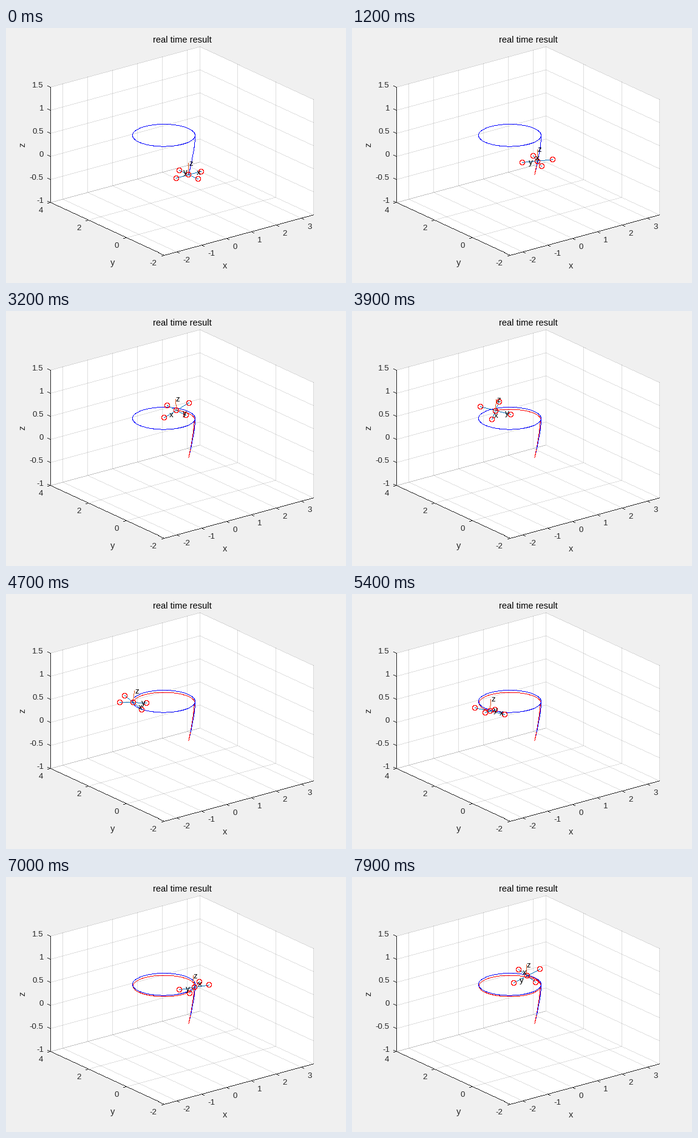
Animation, 560 px wide and 420 px high, one loop 8000 ms. Source, as a matplotlib script:

```python
import numpy as np
import matplotlib.pyplot as plt
from matplotlib.animation import FuncAnimation

W, H, DPI = 560, 420, 100
FRAMES, STEP = 80, 100
PX = 72 / DPI
DARK, BLUE, RED = "#262626", "#0000ff", "#ff0000"
ARM, AXIS = "#0072bd", "#d95319"
plt.rcParams["font.family"] = "Liberation Sans"
plt.rcParams["path.simplify"] = False

ORIGIN = np.array([300.35, 241.2])
BASIS = np.array([[40.95, -11.1], [-31.25, -14.5], [0, -76.0]])


def project(*p):
    return ORIGIN + np.array(p) @ BASIS


fig = plt.figure(figsize=(W / DPI, H / DPI), dpi=DPI, facecolor="#f0f0f0")
ax = fig.add_axes([0, 0, 1, 1])
ax.set_xlim(-0.5, W - 0.5)
ax.set_ylim(H - 0.5, -0.5)
ax.axis("off")


def raster(*lines):
    """Jagged one-pixel polylines, as a dash for every pixel they cross."""
    spots = []
    for pts in lines:
        pts = np.asarray(pts, float)
        spots.append(pts[-1:])
        for a, b in zip(pts[:-1], pts[1:]):
            n = int(np.ceil(np.abs(b - a).max()))
            spots.append(a + np.linspace(0, 1, n + 1)[:, None] * (b - a))
    x, y = np.unique(np.floor(np.concatenate(spots) + 0.5), axis=0).T
    gap = np.full_like(x, np.nan)
    return (np.stack([x - 0.5, x + 0.5, gap], 1).ravel(),
            np.stack([y, y, gap], 1).ravel())


def stroke(color, z=1, pts=None, alpha=1):
    xy = ([], []) if pts is None else raster(pts)
    return ax.plot(*xy, color=color, lw=PX, zorder=z, alpha=alpha,
                   solid_capstyle="butt", snap=False)[0]


def text(x, y, s, size=13.33, color=DARK, **kw):
    kw = {"ha": "center", "va": "center", **kw}
    return ax.text(x, y, s, fontsize=size * PX, color=color, zorder=8, **kw)


# Box walls, grid, axis lines and ticks
X0, X1, Y0, Y1, Z0, Z1 = -2.5, 3.5, -2, 4, -1, 1.5
outline = [(X0, Y1, Z1), (X1, Y1, Z1), (X1, Y0, Z1),
           (X1, Y0, Z0), (X0, Y0, Z0), (X0, Y1, Z0)]
ax.fill(*np.array([project(*p) for p in outline]).T, color="white", lw=0)


def grid(*pts):
    stroke(DARK, 1, [project(*p) for p in pts], alpha=0.15)


def tick(p, dx, dy):
    stroke(DARK, 2, [p, p + (dx, dy)])


for x in range(-2, 4):
    grid((x, Y0, Z0), (x, Y1, Z0), (x, Y1, Z1))
    p = project(x, Y0, Z0)
    tick(p, 4, 2)
    text(p[0] + 10, p[1] + 14.3, str(x), ha="left")
for y in range(-2, 5, 2):
    grid((X0, y, Z0), (X1, y, Z0), (X1, y, Z1))
    p = project(X0, y, Z0)
    tick(p, -4.5, 1.3)
    text(p[0] - 12.7, p[1] + 14, str(y), ha="right")
for z in np.arange(Z0, Z1 + 0.1, 0.5):
    grid((X0, Y1, z), (X1, Y1, z), (X1, Y0, z))
    p = project(X0, Y1, z)
    tick(p, -4.5, -2)
    text(p[0] - 11.5, p[1] - 2, f"{z:g}", ha="right")
stroke(DARK, 2, [project(*p) for p in
                 ((X0, Y1, Z1), (X0, Y1, Z0), (X0, Y0, Z0), (X1, Y0, Z0))])

text(290, 24, "real time result", 14.67, "black", va="baseline")
text(360, 391.5, "x", 14.67)
text(175.5, 387, "y", 14.67)
text(27, 191.5, "z", 14.67, rotation=90)

# Planned path: a climb that joins a circle
a = np.linspace(0, 2 * np.pi, 200)
stroke(BLUE, 4, [project(np.cos(q) - 1, np.sin(q), 1) for q in a])
u = np.linspace(0, 1, 40)[:, None]
stroke(BLUE, 4, (1 - u) ** 2 * ORIGIN + 2 * u * (1 - u) * np.array([311, 197])
       + u ** 2 * np.array([311.2, 176.3]))

CLIMB_END = 2.0
SKEW = np.radians(37.4)
RING = 4 * np.stack([np.cos(a), np.sin(a)], 1)


def phase(t):
    """Angle along the circle as seen on screen."""
    early = np.interp(t, [2.0, 2.7, 3.25], [10, 7.5, 0])
    return np.radians(65.5 + 74.7 * (t - 3.2) + early)


def centre(t):
    """Flown position in pixels."""
    v = np.clip((t - 0.2) / 2.4, 0, 1)
    rise = 65 * v ** 3 * (10 - 15 * v + 6 * v * v)
    s = rise / 58
    f = phase(t)
    cy = 179 - 2 * np.clip(t - 6.6, 0, 1)
    up = t < CLIMB_END
    x = np.where(up, ORIGIN[0] + 9.3 * s * (1.4 - 0.4 * s),
                 259.7 + 51 * np.cos(f))
    y = np.where(up, ORIGIN[1] - rise, cy - 17.5 * np.sin(f))
    return np.stack([x, y], axis=-1)


def body_axes(t):
    """Screen vectors of the unit body axes, yawing and leaning inward."""
    yaw = 0.984 * t
    lag = np.radians(57) * np.clip((3.8 - t) / 1.8, 0, 1)
    out = phase(t) - SKEW - lag
    lean = 0.18 * np.clip((t - 1.2) / 0.7, 0, 1)
    gx, gy = lean * np.cos(out), lean * np.sin(out)
    c, s = np.cos(yaw), np.sin(yaw)
    axes = np.array([[c, s, c * gx + s * gy],
                     [-s, c, -s * gx + c * gy],
                     [-gx, -gy, 1]])
    return axes @ BASIS


# The flown trail starts in front of the plan and goes on behind it
SPLIT = 1.0
trail_start, trail = stroke(RED, 5), stroke(RED, 3)
arms, mast, rotors = stroke(ARM, 6), stroke(AXIS, 6), stroke(RED, 7)
names = [text(0, 0, s, color="black", ha="left", va="baseline") for s in "xyz"]


def update(i):
    t = i * STEP / 1000
    ts = np.linspace(0, t, 4 * i + 1)
    path = centre(ts)
    trail_start.set_data(*raster(path[ts <= SPLIT]))
    later = path[ts >= SPLIT]
    trail.set_data(*(raster(later) if len(later) else ([], [])))

    c = path[-1]
    axes = body_axes(t)
    beams = [np.array([c - d / 2, c + d / 2]) for d in axes[:2]]
    arms.set_data(*raster(*beams))
    mast.set_data(*raster([c, c + axes[2] / 4]))
    hubs = np.floor(np.vstack([c, *beams]) + 0.5)
    rotors.set_data(*raster(*(hub + RING for hub in hubs)))
    for name, d, reach in zip(names, axes, (0.3, 0.3, 0.25)):
        name.set_position(c + d * reach + (0.5, 4))
    return [trail_start, trail, arms, mast, rotors, *names]


anim = FuncAnimation(fig, update, frames=FRAMES, interval=STEP,
                     repeat=True, repeat_delay=0, blit=False)
plt.show()
```
